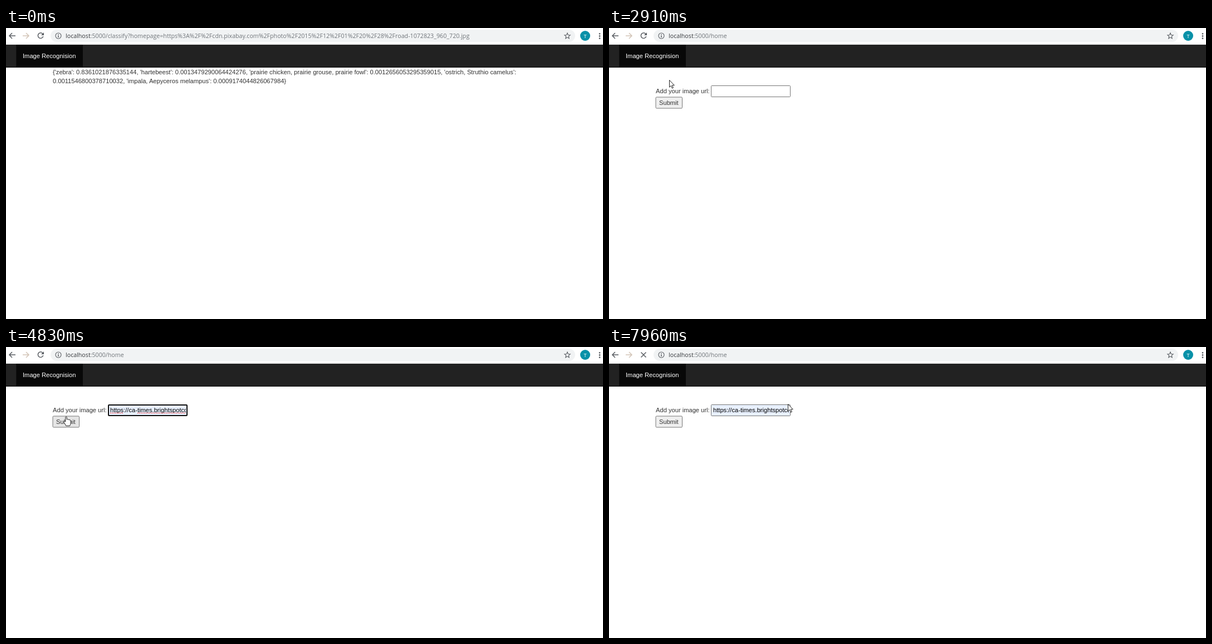
Animation, 1072 px wide and 522 px high, one loop 8 s. Source, as an HTML page:

```html
<!DOCTYPE html>
<html lang="en">
<head>
<meta charset="utf-8">
<title>Image Recognision</title>
<style>
html, body { margin: 0; width: 100%; height: 100%; overflow: hidden; background: #fff; }
svg { display: block; }
text { font: 11.15px "Liberation Sans", Arial, sans-serif; fill: #333; white-space: pre; }
.url { font: 10.66px "Open Sans", sans-serif; fill: #70757a; }
.host { fill: #36393d; }
.item { font: 600 9.88px "Open Sans", sans-serif; fill: #222; }
.icon { fill: none; stroke: #5a5e63; stroke-width: 1.5; }
.thin { stroke-width: 1.1; }
.solid { fill: #5a5e63; }
.cursor { fill: #fff; stroke: #222; stroke-linejoin: round; }
#field { fill: #fff; stroke: #767676; }
#field.filled { fill: #e8f0fe; }
#field.focus { stroke: #101010; stroke-width: 2; }
#button { fill: #efefef; stroke: #767676; }
#button.over { fill: #e5e5e5; }
</style>
</head>
<body>
<svg width="1072" height="522" viewBox="0 0 1072 522">
  <defs>
    <clipPath id="fieldClip"><rect x="185" y="104" width="138" height="18"/></clipPath>
    <clipPath id="listClip"><rect x="184" y="125" width="355" height="69"/></clipPath>
    <filter id="shadow" x="-5%" y="-10%" width="110%" height="130%">
      <feDropShadow dx="0" dy="1" stdDeviation="1.3" flood-opacity=".4"/>
    </filter>
    <path id="back" d="M6 0H-5M0 -5L-5 0L0 5"/>
  </defs>

  <!-- browser bar -->
  <rect x="80" y="3" width="942" height="22" rx="11" fill="#f1f3f4"/>
  <use href="#back" class="icon" x="11" y="14"/>
  <use href="#back" class="icon" style="stroke:#d3c5b8" transform="translate(36 14) scale(-1 1)"/>
  <g id="reload">
    <path class="icon" d="M66.2 11A4.8 4.8 0 1 0 66.8 15"/>
    <path class="solid" d="M68 8V13H63z"/>
  </g>
  <path id="stop" class="icon" d="M57.5 9.500L66.500 18.500M66.500 9.500L57.500 18.500"/>
  <circle class="icon thin" cx="94" cy="14" r="5"/>
  <path class="icon" d="M94 11V12.500M94 13.500V17"/>
  <polygon id="star" class="icon thin"/>
  <circle cx="1040" cy="14" r="9" fill="#0891a8"/>
  <text x="1040" y="17.500" text-anchor="middle" style="font-size:9px;fill:#fff">T</text>
  <path d="M1066 10.300V19" stroke="#5a5e63" stroke-width="2.800" stroke-linecap="round" stroke-dasharray="0 4.200"/>
  <text class="url" x="107" y="18"><tspan class="host">localhost</tspan><tspan id="path"></tspan></text>

  <!-- navigation -->
  <rect y="29" width="1072" height="1" fill="#e0e0e0"/>
  <rect y="30" width="1072" height="41" fill="#222"/>
  <rect y="70" width="1072" height="1" fill="#080808"/>
  <rect x="18.400" y="30" width="119.600" height="41" fill="#080808"/>
  <text x="30" y="54" style="fill:#fff">Image Recognision</text>

  <g id="result">
    <text x="84" y="83">{'zebra': 0.8361021876335144, 'hartebeest': 0.0013479290064424276, 'prairie chicken, prairie grouse, prairie fowl': 0.0012656053295359015, 'ostrich, Struthio camelus':</text>
    <text x="84" y="99">0.0011546800378710032, 'impala, Aepyceros melampus': 0.0009174044826067984}</text>
  </g>

  <g id="form">
    <text x="84" y="117">Add your image url:</text>
    <rect id="field" rx="1"/>
    <g id="value" clip-path="url(#fieldClip)">
      <text x="187" y="117" style="fill:#000">https://ca-times.brightspotcdn.com</text>
      <path id="squiggle" d="M187 118.500H211M236 118.500H323" stroke="#e33" stroke-dasharray="2 1"/>
    </g>
    <path id="caret" d="M187.500 107V120" stroke="#555"/>
    <rect id="button" x="84" y="124" width="47.500" height="20" rx="1.500"/>
    <text x="90" y="138">Submit</text>
  </g>

  <g id="list">
    <rect x="183.500" y="124.500" width="363.500" height="70" rx="2" fill="#fff" filter="url(#shadow)"/>
    <rect id="hover" x="184" y="131" width="363" height="28.500" fill="#e8e8e9"/>
    <g clip-path="url(#listClip)">
      <text class="item" x="193" y="149">https://ca-times.brightspotcdn.com/dims4/default/a6d0b97/2147483647,</text>
      <text class="item" x="193" y="178">https://cdn.pixabay.com/photo/2015/12/01/20/28/road-1072823_960_720</text>
    </g>
  </g>

  <g id="pointer">
    <path id="arrow" class="cursor" d="M.5 .5V13.200L3.400 10.500L5.400 15.200L7.400 14.300L5.400 9.800H9.300z"/>
    <path id="hand" class="cursor" d="M-1.200 10V1.800Q0 -.2 1.200 1.800V6Q2.600 4.800 3.700 6.300Q5 5.300 6 6.900Q7.500 6.100 8.200 7.800V12Q8 14.500 6.500 17.500H-.2Q-1 15.500 -3.700 11.500Q-4.500 9.300 -2.800 9.200z"/>
    <path id="beam" class="icon thin" d="M-2.500 -7.500H2.500M0 -7.500V7.500M-2.500 7.500H2.500"/>
  </g>
</svg>

<script>
const LOOP = 8000, TICK = 77, ENTER = 360;
const OPEN_HOME = 2430, FOCUS = 3590, OPEN_LIST = 3840, PICK = 4440, BLUR = 5130, LOAD = 5200;
const query = "/classify?homepage=https%3A%2F%2Fcdn.pixabay.com%2Fphoto%2F2015%2F12%2F01%2F20%2F28%2Froad-1072823_960_720.jpg";

// pointer moves: start, end, goal x, goal y; it rests in between
const moves = [
  [283, 520, 504, 407], [823, 1360, 50, 111], [1360, 1670, 47, 83], [1670, 2500, 50, 45],
  [2530, 2900, 108, 93], [2900, 3140, 174, 119], [3140, 3370, 141, 120], [3370, 3590, 198, 113],
  [3700, 3975, 210, 123], [3975, 4130, 226, 141], [4300, 4820, 108, 124], [5130, 5200, 104, 122],
  [6060, 6130, 110, 86], [6130, 6380, 150, 66], [6380, 6910, 290, 84], [7013, 7480, 291, 94],
  [7560, 7730, 296, 96], [7800, 7900, 321, 102]
];

const $ = id => document.getElementById(id);
const show = (id, on) => { $(id).style.display = on ? "" : "none"; };

function pointerAt(t) {
  let x = 909, y = 562;
  for (const [start, end, goalX, goalY] of moves) {
    const f = Math.min(1, Math.max(0, (t - start) / (end - start)));
    x += (goalX - x) * f;
    y += (goalY - y) * f;
  }
  return [Math.round(x), Math.round(y)];
}

const star = Array.from({ length: 10 }, (_, i) => {
  const r = i % 2 ? 2.4 : 5.4, a = i * Math.PI / 5;
  return [1008 + r * Math.sin(a), 14.4 - r * Math.cos(a)];
});
$("star").setAttribute("points", star.join(" "));

function draw(now) {
  // the screen refreshes once per tick
  const t = ENTER + TICK * Math.floor((now % LOOP - ENTER + 10) / TICK);
  const [x, y] = pointerAt(t);
  const over = (left, top, right, bottom) => x >= left && x < right && y >= top && y < bottom;
  const home = t >= OPEN_HOME, filled = t >= PICK, loading = t >= LOAD;
  const focus = t >= FOCUS && t < BLUR;

  $("path").textContent = ":5000" + (home ? "/home" : query);
  show("result", !home);
  show("form", home);
  show("reload", !loading);
  show("stop", loading);

  const field = $("field"), inset = focus ? 1 : 0.5;
  field.setAttribute("class", (filled ? "filled " : "") + (focus ? "focus" : ""));
  field.setAttribute("x", 183 + inset);
  field.setAttribute("y", 103 + inset);
  field.setAttribute("width", 143 - 2 * inset);
  field.setAttribute("height", 21 - 2 * inset);
  show("value", filled);
  show("squiggle", focus);
  show("caret", focus && !filled);

  show("list", t >= OPEN_LIST && !filled);
  show("hover", y > 131);

  const overButton = over(84, 123, 132, 144), overField = over(183, 104, 326, 122);
  const hand = overButton || over(18, 30, 138, 71);
  $("button").setAttribute("class", overButton ? "over" : "");
  show("hand", hand);
  show("beam", overField);
  show("arrow", !hand && !overField);
  show("pointer", t >= ENTER);
  $("pointer").setAttribute("transform", `translate(${x} ${y})`);
}

const begin = performance.now();
function frame() {
  draw(performance.now() - begin);
  requestAnimationFrame(frame);
}
frame();
</script>
</body>
</html>
```
